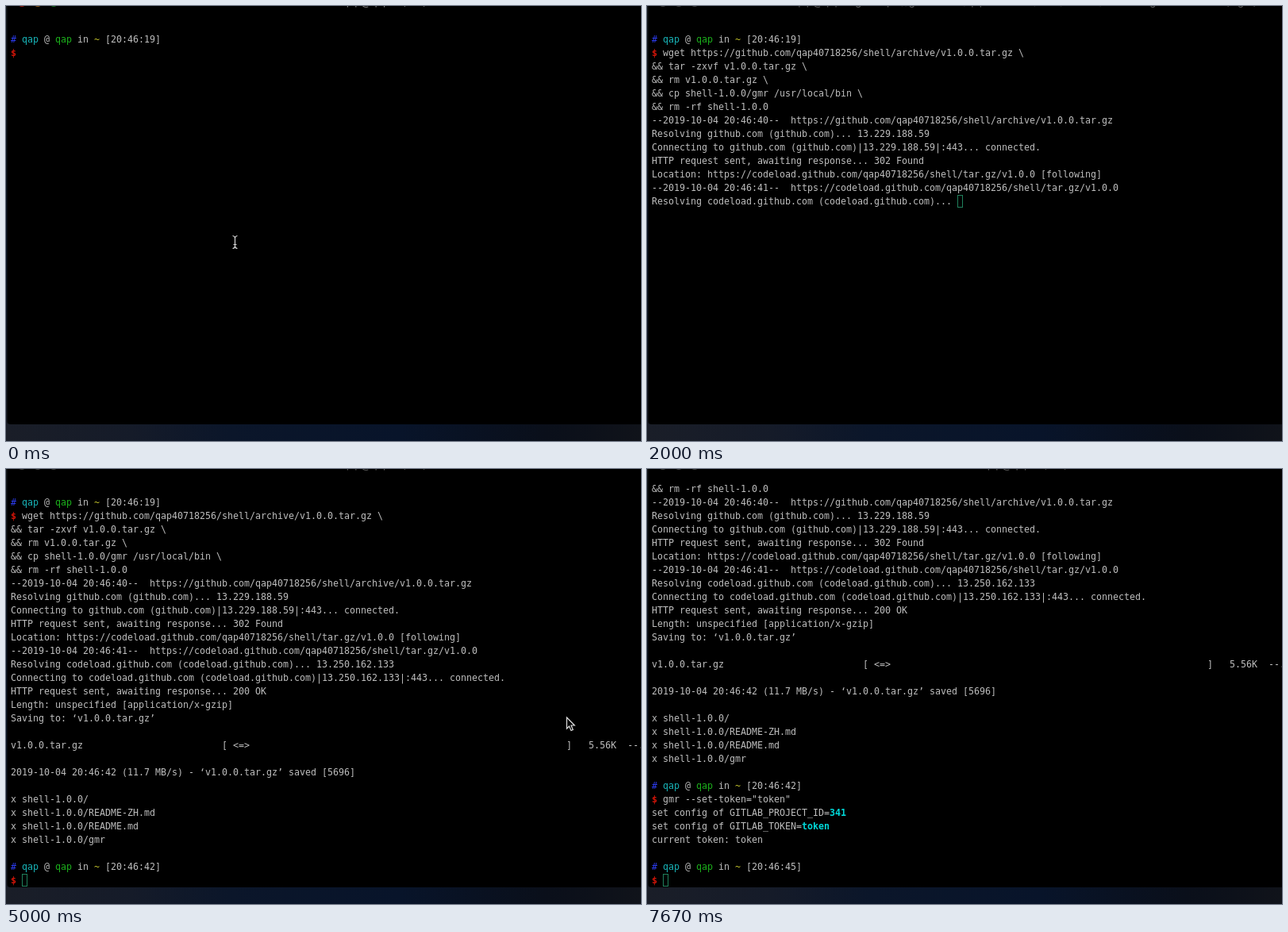
Write an HTML page with a canvas that moves like this. It is 800 px wide and 548 px high and loops after 8000 ms.

```html
<!DOCTYPE html>
<html lang="en">
<head>
<meta charset="utf-8">
<title>Terminal session</title>
<style>
html, body { margin: 0; width: 100%; height: 100%; overflow: hidden; background: #000; }
canvas { display: block; }
</style>
</head>
<body>
<canvas id="stage" width="800" height="548"></canvas>
<script>
const ctx = document.getElementById('stage').getContext('2d');
const LOOP = 8000, LEFT = 6, CELL = 7, LINE = 17, BASE = 46, ROWS = 29;
const MONO = '11.63px "DejaVu Sans Mono", "Liberation Mono", monospace';
const UI = '13px Inter, "Open Sans", sans-serif';
const user = 'qap', repo = user + '40718256/shell';

// A "§" plus one letter switches the text style.
const colors = {
  w: '#bebebe', b: '#2c3cf0', c: '#18b4b8', g: '#1cb01c',
  y: '#c4c42c', r: '#d01408', v: '#00d8d8'
};
const pastes = { 1: [330, 1000], 2: [5670, 6670] };

const prompt = time => `§b#§w §c${user}§w @ §g${user}§w in §y~§w [${time}]\n§r$§w `;
const archive = `https://github.com/${repo}/archive/v1.0.0.tar.gz`;
const load = `https://codeload.github.com/${repo}/tar.gz/v1.0.0`;
const wget = `wget ${archive} \\
&& tar -zxvf v1.0.0.tar.gz \\
&& rm v1.0.0.tar.gz \\
&& cp shell-1.0.0/gmr /usr/local/bin \\
&& rm -rf shell-1.0.0`;
const progress = 'v1.0.0.tar.gz'.padEnd(38) + '[ <=>'.padEnd(62) + ']   5.56K  --.-KB/s';

// Terminal output: [time, text appended]
const output = [
  [0, prompt('20:46:19')],
  [330, `§1${wget}§w`],
  [1000, `
--2019-10-04 20:46:40--  ${archive}
Resolving github.com (github.com)... 13.229.188.59
Connecting to github.com (github.com)|13.229.188.59|:443... `],
  [1330, 'connected.\nHTTP request sent, awaiting response... '],
  [1670, `302 Found
Location: ${load} [following]
--2019-10-04 20:46:41--  ${load}
Resolving codeload.github.com (codeload.github.com)... `],
  [2330, `13.250.162.133
Connecting to codeload.github.com (codeload.github.com)|13.250.162.133|:443... `],
  [2670, 'connected.\nHTTP request sent, awaiting response... '],
  [3670, `200 OK
Length: unspecified [application/x-gzip]
Saving to: ‘v1.0.0.tar.gz’

${progress}

2019-10-04 20:46:42 (11.7 MB/s) - ‘v1.0.0.tar.gz’ saved [5696]

x shell-1.0.0/
x shell-1.0.0/README-ZH.md
x shell-1.0.0/README.md
x shell-1.0.0/gmr
`],
  [4000, '\n' + prompt('20:46:42')],
  [5670, '§2gmr --set-token="token"§w'],
  [6670, `
set config of GITLAB_PROJECT_ID=§v341§w
set config of GITLAB_TOKEN=§vtoken§w
current token: token

${prompt('20:46:45')}`]
];

const within = (t, [from, to]) => t >= from && t < to;
const focused = t => t < 2000 || within(t, [5330, 7670]);

function gradient(x, y, stops) {
  const fill = ctx.createLinearGradient(0, 0, x, y);
  stops.forEach(([at, color]) => fill.addColorStop(at, color));
  return fill;
}

function drawDesktop() {
  ctx.fillStyle = '#000';
  ctx.fillRect(0, 0, 800, 548);

  ctx.fillStyle = gradient(800, 0, [
    [0, '#1a1e28'], [.2, '#151b29'], [.35, '#0b162a'],
    [.62, '#08142a'], [.85, '#0a0f1a'], [1, '#10131a']]);
  ctx.fillRect(0, 527, 800, 21);

  ctx.fillStyle = gradient(0, 527, [[0, '#14181c'], [.6, '#0c1626'], [1, '#181c26']]);
  ctx.fillRect(0, 0, 1.5, 527);

  ctx.fillStyle = '#181c26';
  ctx.beginPath();
  ctx.moveTo(1, 523);
  ctx.quadraticCurveTo(1.5, 527, 6, 527);
  ctx.lineTo(1, 527);
  ctx.fill();
}

// Only the lowest pixels of the title bar reach into view.
function drawTitle(t) {
  const lights = focused(t) ? ['#a01c14', '#90581a', '#147020'] : ['#3c3c3c', '#3c3c3c', '#3c3c3c'];
  lights.forEach((color, i) => {
    ctx.fillStyle = color;
    ctx.beginPath();
    ctx.arc(20 + 20 * i, -5, 6, 0, 7);
    ctx.fill();
  });
  const busy = within(t, [1670, 4330]);
  ctx.font = UI;
  ctx.textAlign = 'center';
  ctx.fillStyle = focused(t) ? '#888' : '#5c5c5c';
  ctx.fillText(busy
    ? `${user}@${user}: wget ${archive} && tar -zxvf (wget)`
    : `${user}@${user}:~ (zsh)`, 477, -1);
  ctx.textAlign = 'left';
}

function drawTerminal(t) {
  const text = output.filter(o => t >= o[0]).map(o => o[1]).join('');
  const scroll = Math.max(0, text.split('\n').length - ROWS);
  let row = -scroll, col = 0, style = 'w';

  for (let i = 0; i < text.length; i++) {
    const ch = text[i];
    if (ch === '§') { style = text[++i]; continue; }
    if (ch === '\n') { row++; col = 0; continue; }
    if (row >= -1) {
      const x = LEFT + col * CELL, y = BASE + row * LINE;
      const inverse = pastes[style] && within(t, pastes[style]);
      if (inverse) {
        ctx.fillStyle = '#c4c4c4';
        ctx.fillRect(x, y - 12, CELL, 16);
      }
      ctx.font = ('rv'.includes(style) ? 'bold ' : '') + MONO;
      ctx.fillStyle = inverse ? '#000' : colors[style] || colors.w;
      ctx.fillText(ch, x, y);
    }
    col++;
  }
  if (t >= 330) drawCaret(LEFT + col * CELL, BASE + row * LINE - 12, focused(t));
}

function drawCaret(x, y, solid) {
  if (solid) {
    ctx.fillStyle = '#4c8868';
    ctx.fillRect(x, y, CELL, 16);
  } else {
    ctx.strokeStyle = '#20805c';
    ctx.lineWidth = 1;
    ctx.strokeRect(x + .5, y + .5, CELL - 1, 15);
  }
}

function drawBeam(x, y) {
  ctx.strokeStyle = '#d4d4d4';
  ctx.lineWidth = 1.2;
  ctx.beginPath();
  for (const s of [-1, 1]) {
    ctx.moveTo(x - 3, y + 8 * s);
    ctx.quadraticCurveTo(x, y + 7.5 * s, x, y + 5 * s);
    ctx.quadraticCurveTo(x, y + 7.5 * s, x + 3, y + 8 * s);
  }
  ctx.moveTo(x, y - 6);
  ctx.lineTo(x, y + 6);
  ctx.moveTo(x - 2, y + 3);
  ctx.lineTo(x + 2, y + 3);
  ctx.stroke();
}

function drawArrow(x, y) {
  ctx.beginPath();
  [[0, 0], [0, 14], [3, 11], [5.5, 16.5], [7.8, 15.5], [5.5, 10], [9.8, 10]]
    .forEach(([dx, dy]) => ctx.lineTo(x + dx, y + dy));
  ctx.closePath();
  ctx.fillStyle = '#000';
  ctx.fill();
  ctx.strokeStyle = '#e0e0e0';
  ctx.lineWidth = 1.2;
  ctx.stroke();
}

function drawPointer(t) {
  if (t < 330) drawBeam(288.5, 297.5);
  else if (within(t, [5000, 5330])) drawArrow(706.5, 313);
  else if (within(t, [5330, 6670])) drawBeam(684.5, 387);
}

function frame(now) {
  const t = now % LOOP;
  drawDesktop();
  drawTitle(t);
  drawTerminal(t);
  drawPointer(t);
  requestAnimationFrame(frame);
}
frame(0);
</script>
</body>
</html>
```
